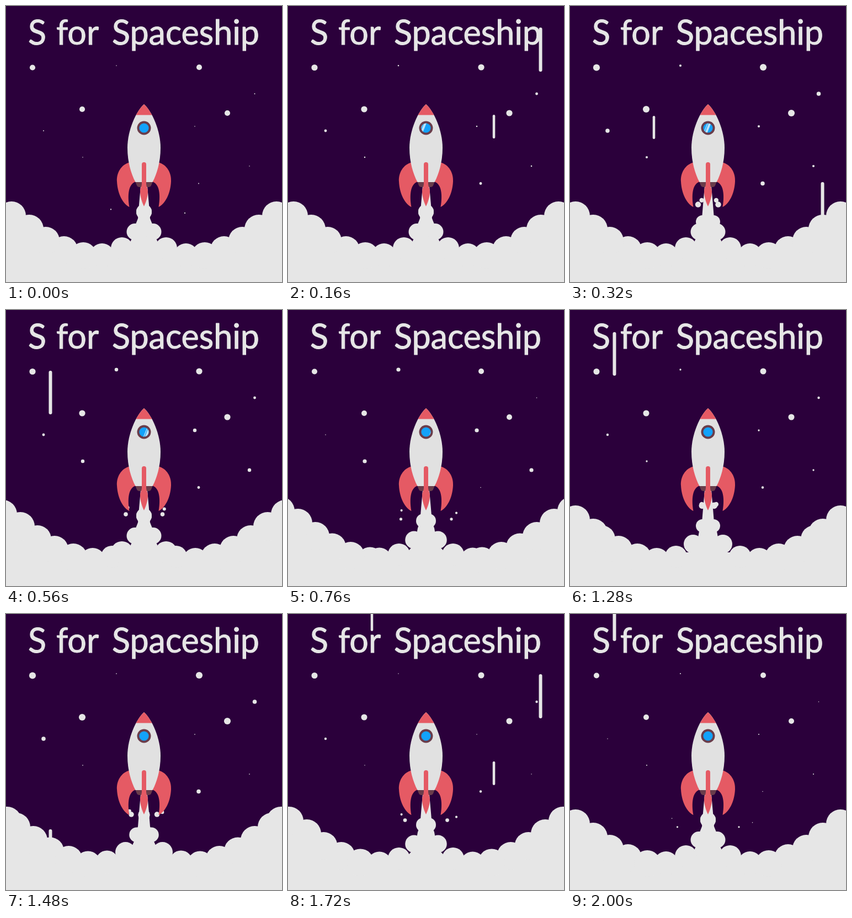
An HTML page with a canvas for the animation above (2040 ms loop, 500x500 px).

```html
<!DOCTYPE html>
<html lang="en">
<head>
<meta charset="utf-8">
<title>S for Spaceship</title>
<style>
html, body { margin: 0; width: 100%; height: 100%; overflow: hidden; background: #2b003b; }
canvas { display: block; width: 500px; height: 500px; }
</style>
</head>
<body>
<canvas id="stage" width="500" height="500"></canvas>
<script>
const ctx = document.getElementById('stage').getContext('2d');
const STEP = 40, COUNT = 51, MID = 250;
const NIGHT = '#2b003b', PALE = '#e6e6e6', BODY = '#e1e1e1';
const RED = '#e55a64', DARK = '#6a3d4b', BLUE = '#13a2fb';

// Smoke route: distance from the centre line, y, radius; one stop per 18 px
const ROUTE = [
  [0, 337, 3], [0, 355, 7], [0, 373, 14], [10, 391, 12], [16.5, 409, 15], [27, 424, 17],
  [40, 439, 20], [58, 447, 20], [76, 452, 22], [93, 454, 23], [110, 452, 24], [128, 448, 25],
  [145, 442, 25], [162, 434, 25], [178, 425, 25], [193, 415, 25], [208, 404, 26],
  [224, 392, 26], [240, 380, 26], [256, 370, 26], [272, 358, 26]
];
const BANK = 6;

const BIG = [[48, 111.5], [350, 111], [138, 187], [401, 194]];
const SLOW = [[200, 108], [342, 218], [139, 274], [441, 290]];
const QUICK = [[450.5, 159], [68, 226], [349, 321.5]];

// x, top at 200 ms of the cycle, length, width
const STREAKS = [[80.5, -520, 79, 6], [457.5, 109, 80, 6], [152, -11, 42, 4.5], [373, 267, 43, 4.5]];

function disc(x, y, r, color = PALE) {
  if (r <= 0) return;
  ctx.fillStyle = color;
  ctx.beginPath();
  ctx.arc(x, y, r, 0, Math.PI * 2);
  ctx.fill();
}

function shape(d, color) {
  ctx.fillStyle = color;
  ctx.fill(new Path2D(d));
}

// Smooth bump from 0 to 1 and back
function pulse(t, peak, half) {
  const d = Math.abs(t - peak);
  return d < half ? (1 + Math.cos(Math.PI * d / half)) / 2 : 0;
}

function drawStars(t) {
  const quick = pulse(t, 360, 430) + pulse(t, 1500, 430);
  const slow = pulse(t, 760, 850) + pulse(t, 2680, 850);
  for (const [x, y] of BIG) disc(x, y, 5 + 1.1 * quick);
  for (const [x, y] of QUICK) disc(x, y, 0.7 + 3.1 * quick);
  for (const [x, y] of SLOW) disc(x, y, 0.7 + 2.9 * slow);
}

function drawStreaks(t) {
  const fall = 1.75 * (t % 760 - 200);
  ctx.strokeStyle = PALE;
  ctx.lineCap = 'round';
  for (const [x, top, len, w] of STREAKS) {
    const y = top + fall;
    ctx.lineWidth = w;
    ctx.beginPath();
    ctx.moveTo(x, y + w / 2);
    ctx.lineTo(x, y + len - w / 2);
    ctx.stroke();
  }
}

function drawSparks(f) {
  for (const birth of [4.8, 31.8]) {
    const a = f - birth;
    if (a < 0 || a > 22) continue;
    const dx = 10 + 2.5 * a, y = 354 + 1.75 * a, r = 6 - 0.24 * a;
    disc(MID - dx, y, r);
    disc(MID + 0.5 + dx, y, r);
  }
  for (const birth of [-20, 4.2, 28.2]) {
    const a = f - birth;
    if (a < 0 || a > 23) continue;
    const r = 4.9 - 0.19 * a;
    disc(MID - 3 * a, 348 + 1.02 * a, r);
    disc(MID + 1 + 3.65 * a, 346.5 + 1.43 * a, r);
  }
}

function puff(s) {
  const p = s / 18 + 2, i = Math.floor(p);
  if (i < 0 || i >= ROUTE.length - 1) return;
  const [dx, y, r] = ROUTE[i].map((v, k) => v + (ROUTE[i + 1][k] - v) * (p - i));
  disc(MID - dx, y, r);
  disc(MID + dx, y, r);
}

function drawSmoke(f) {
  shape('M244 326H256L259 360L261 385L265 395L268 412L276 430L290 445H210L224 430L232 412L235 395L239 385L241 360Z', PALE);
  const bank = ROUTE.slice(BANK);
  ctx.beginPath();
  ctx.moveTo(-30, 500);
  for (const [dx, y] of [...bank].reverse()) ctx.lineTo(MID - dx, y);
  for (const [dx, y] of bank) ctx.lineTo(MID + dx, y);
  ctx.lineTo(530, 500);
  ctx.fill();
  // The puffs come every four steps, with one short gap early in the loop
  for (let b = 4; b > -44; b -= 4) puff(9 * (f - b));
  for (let b = 6; b < COUNT + 4; b += 4) puff(9 * (f - b));
}

function drawWindow(f) {
  disc(MID, 221, 12.5, DARK);
  disc(MID, 221, 8.6, BLUE);
  if (f < 1 || f > 20) return;
  const x = MID + 1.2 * (f - 8);
  ctx.save();
  ctx.beginPath();
  ctx.arc(MID, 221, 8.6, 0, Math.PI * 2);
  ctx.clip();
  ctx.strokeStyle = '#b9e2fb';
  for (const [shift, w] of [[0, 4], [-4.2, 1.3]]) {
    ctx.lineWidth = w;
    ctx.beginPath();
    ctx.moveTo(x + shift + 4, 211);
    ctx.lineTo(x + shift - 4, 231);
    ctx.stroke();
  }
  ctx.restore();
}

function drawFin() {
  shape('M225 283C208 287 200 303 201 318C202 340 212 359 223.5 364C221 350 219 322 236 318L230 290Z', RED);
}

function drawRocket(f) {
  drawFin();
  ctx.save();
  ctx.translate(2 * MID, 0);
  ctx.scale(-1, 1);
  drawFin();
  ctx.restore();
  shape('M234 318H266L263 325Q262 328 258 328H242Q238 328 237 325Z', DARK);
  const hull = 'M250 178C236 190 220 225 220 257C220 283 227 305 234.5 319H265.5C273 305 280 283 280 257C280 225 264 190 250 178Z';
  shape(hull, BODY);
  ctx.save();
  ctx.clip(new Path2D(hull));
  ctx.fillStyle = RED;
  ctx.fillRect(230, 170, 40, 27.5);
  ctx.restore();
  drawWindow(f);
  shape('M246 287A4 4 0 0 1 254 287V322C254 327 257 330 257 336C257 346 253 357 250 363C247 357 243 346 243 336C243 330 246 327 246 322Z', RED);
}

function drawTitle() {
  ctx.font = '61px Lato, "Open Sans", sans-serif';
  ctx.fillStyle = ctx.strokeStyle = PALE;
  ctx.lineWidth = 1;
  ctx.lineJoin = 'round';
  for (const [word, x] of [['S', 40], ['for', 91], ['Spaceship', 192]]) {
    ctx.fillText(word, x, 70);
    ctx.strokeText(word, x, 70);
  }
}

function draw(f) {
  const t = f * STEP;
  ctx.fillStyle = NIGHT;
  ctx.fillRect(0, 0, 500, 500);
  drawStars(t);
  drawStreaks(t);
  drawSparks(f);
  drawSmoke(f);
  drawRocket(f);
  drawTitle();
}

let start;
function tick(now) {
  if (start === undefined) start = now;
  draw(Math.floor(Math.max(0, now - start) / STEP) % COUNT);
  requestAnimationFrame(tick);
}
draw(0);
requestAnimationFrame(tick);
</script>
</body>
</html>
```
